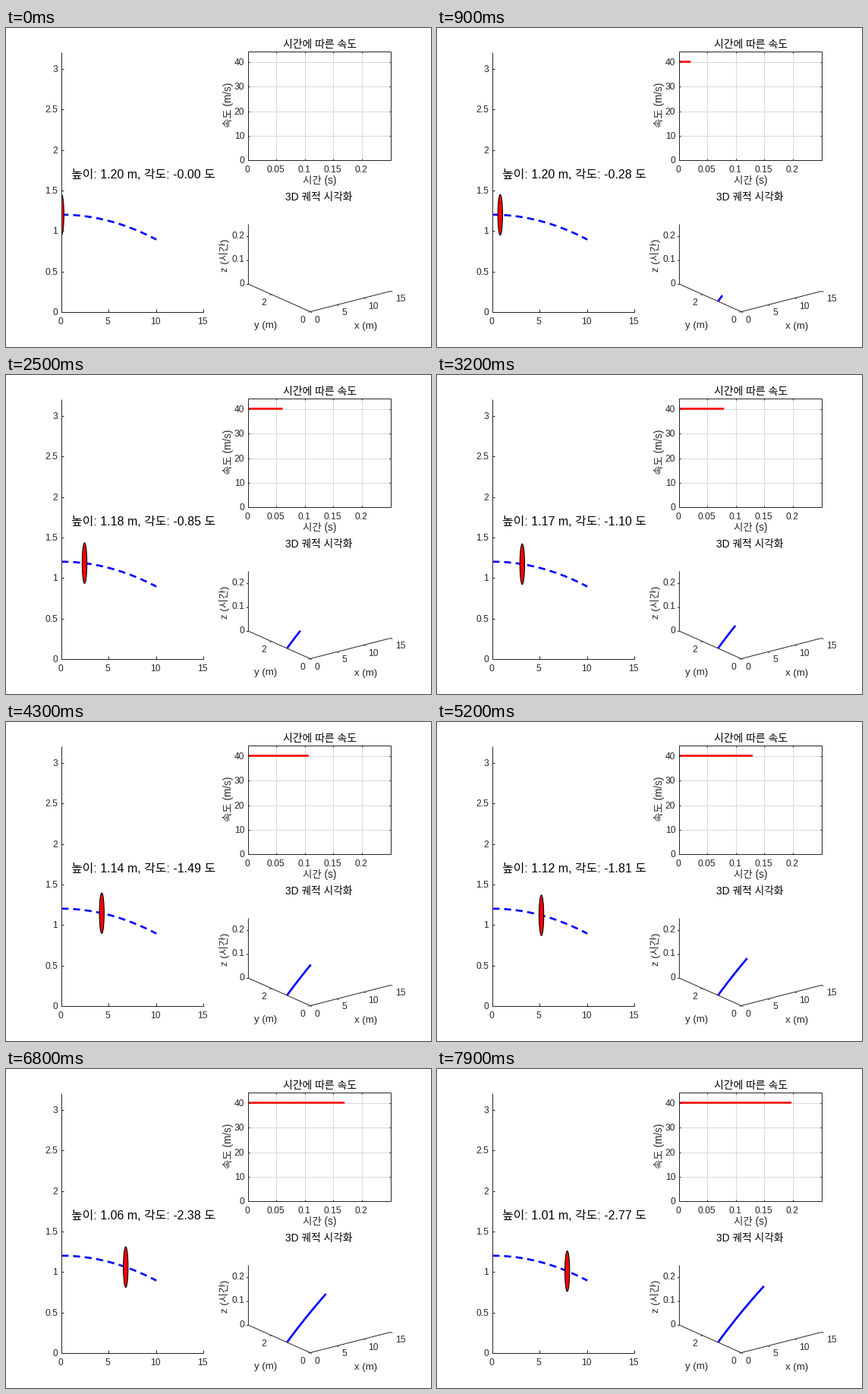
Write a matplotlib script that moves like this. It is 560x420 px and loops after 8 s.

```python
import numpy as np
import matplotlib.pyplot as plt
from matplotlib.animation import FuncAnimation
from matplotlib.patches import Ellipse, Rectangle

W, H, DPI = 560, 420, 100
PT = 72 / DPI                      # points per pixel
INK, GRID = "#262626", "#dadada"
V0, G, H0, T_END, SAMPLES = 40.0, 9.81, 1.2, 0.25, 100

plt.rcParams["font.family"] = ["Liberation Sans", "Noto Sans CJK JP"]

fig = plt.figure(figsize=(W / DPI, H / DPI), dpi=DPI, facecolor="white")
ax = fig.add_axes([0, 0, 1, 1])
ax.set_xlim(0, W)
ax.set_ylim(H, 0)
ax.axis("off")


def line(xs, ys, color=INK, width=1.0, z=5, snap=None, **kw):
    art, = ax.plot(xs, ys, color=color, lw=width * PT, zorder=z,
                   solid_capstyle="butt", dash_capstyle="butt", **kw)
    if snap is not None:
        art.set_snap(snap)
    return art


def label(x, y, s, size=12, ha="center", color=INK, rotation=0):
    return ax.text(x, y, s, fontsize=size * PT, color=color, ha=ha,
                   va="baseline", rotation=rotation,
                   rotation_mode="anchor", zorder=8)


def cell(v):
    """Centre of the pixel holding a ruler position."""
    return np.floor(v - 0.8) + 0.5


class Plot2D:
    """Maps data to stage pixels inside a fixed rectangle."""

    def __init__(self, left, top, right, bottom, xmax, ymax):
        self.left, self.top, self.right, self.bottom = left, top, right, bottom
        self.sx = (right - left) / xmax
        self.sy = (bottom - top) / ymax

    def x(self, v):
        return self.left + np.asarray(v) * self.sx

    def y(self, v):
        return self.bottom - np.asarray(v) * self.sy

    def frame(self, xticks, yticks, tick, base, box=False, grid=False):
        l, r = cell(self.left), cell(self.right)
        t, b = cell(self.top), cell(self.bottom)
        line([l, l], [t, b], snap=True)
        line([l, r], [b, b], snap=True)
        if box:
            line([r, r], [t, b], snap=True)
            line([l, r], [t, t], snap=True)
        for v in xticks:
            px = cell(self.x(v))
            if grid and v:
                line([px, px], [t, b], GRID, z=1, snap=True)
            line([px, px], [b, b - tick], snap=True)
            if box:
                line([px, px], [t, t + tick], snap=True)
            label(px - 0.2, base, f"{v:g}")
        for v in yticks:
            py = min(cell(self.y(v) + 0.6), b)
            if grid and v:
                line([l, r], [py, py], GRID, z=1, snap=True)
            line([l, l + tick], [py, py], snap=True)
            if box:
                line([r, r - tick], [py, py], snap=True)
            label(l - 4.2, py + 4.2, f"{v:g}", ha="right")


# Flight view
flight = Plot2D(73.2, 32.0, 260.6, 374.1, 15, 3.2)
flight.frame([0, 5, 10, 15], np.arange(0, 3.1, 0.5), 3.4, 389.5)

# Speed over time
speed = Plot2D(319.2, 31.4, 506.8, 174.7, 0.25, 44)
speed.frame([0, 0.05, 0.1, 0.15, 0.2], [0, 10, 20, 30, 40], 2, 190,
            box=True, grid=True)
label(413.5, 26.4, "시간에 따른 속도", 13.9, color="black")
label(413, 205.2, "시간 (s)", 13.5)
label(296.6, 101.5, "속도 (m/s)", 13.5, rotation=90)

# Orthographic 3D view
ORIGIN = np.array([400.8, 373.5])
AX_X = np.array([106.0, -27.0])
AX_Y = np.array([-81.4, -36.3])
AX_Z = np.array([0.0, -78.7])


def project(x, y, z):
    parts = (np.multiply.outer(np.asarray(v, float) / top, axis)
             for v, top, axis in ((x, 15, AX_X), (y, 3.2, AX_Y), (z, 0.25, AX_Z)))
    return ORIGIN + sum(parts)


def tick3d(p, axis):
    d = -2.6 * axis / np.hypot(*axis)
    line([p[0], p[0] + d[0]], [p[1], p[1] + d[1]])


ends = np.array([project(15, 0, 0), ORIGIN, project(0, 3.2, 0),
                 project(0, 3.2, 0.25)])
line(ends[:, 0], ends[:, 1])
for v in (0, 5, 10, 15):
    p = project(v, 0, 0)
    tick3d(p, AX_Y)
    label(p[0] + 6, p[1] + 14, f"{v}", ha="left")
for v in (0, 2):
    p = project(0, v, 0)
    tick3d(p, AX_X)
    label(p[0] - 7, p[1] + 14, f"{v}", ha="right")
for v in (0, 0.1, 0.2):
    p = project(0, 3.2, v)
    tick3d(p, AX_X)
    label(p[0] - 5.4, p[1] + 2.7, f"{v:g}", ha="right")
label(412.5, 227, "3D 궤적 시각화", 13.8, color="black")
label(474, 396.2, "x (m)", 13.2)
label(342, 395, "y (m)", 13.2)
label(291.6, 299.5, "z (시간)", 13.2, rotation=90)

# Trajectory samples
t = np.linspace(0, T_END, SAMPLES)
px = V0 * t
py = H0 - G * t ** 2 / 2
v = np.hypot(V0, G * t)
angle = np.degrees(np.arctan2(-G * t, V0))
path = project(px, py, t)

line(flight.x(px), flight.y(py), "blue", 2.67, z=2,
     linestyle=(0, (3.45, 2.28)))
ball = Ellipse((0, 0), 0.5 * flight.sx, 0.5 * flight.sy, facecolor="red",
               edgecolor="black", lw=1.1 * PT, zorder=4)
ax.add_patch(ball)
window = Rectangle((flight.left - 0.7, flight.top), flight.right - flight.left,
                   flight.bottom - flight.top, transform=ax.transData)
ball.set_clip_path(window)

speed_line = line([], [], "red", 2.67, z=4, snap=False)
path_line = line([], [], "blue", 2.67, z=6)
info = label(85.6, 198, "", 15.97, ha="left", color="black")


def update(n):
    k = n if n < 5 else n - 1      # one sample is held for two frames
    ball.center = (flight.x(px[k]), flight.y(py[k]))
    speed_line.set_data(speed.x(t[:k + 1]), speed.y(v[:k + 1]))
    path_line.set_data(path[:k + 1, 0], path[:k + 1, 1])
    info.set_text(f"높이: {py[k]:.2f} m, 각도: {angle[k]:.2f} 도")
    return ball, speed_line, path_line, info


anim = FuncAnimation(fig, update, frames=80, interval=100, repeat=True,
                     repeat_delay=0, init_func=lambda: update(0))
plt.show()
```
